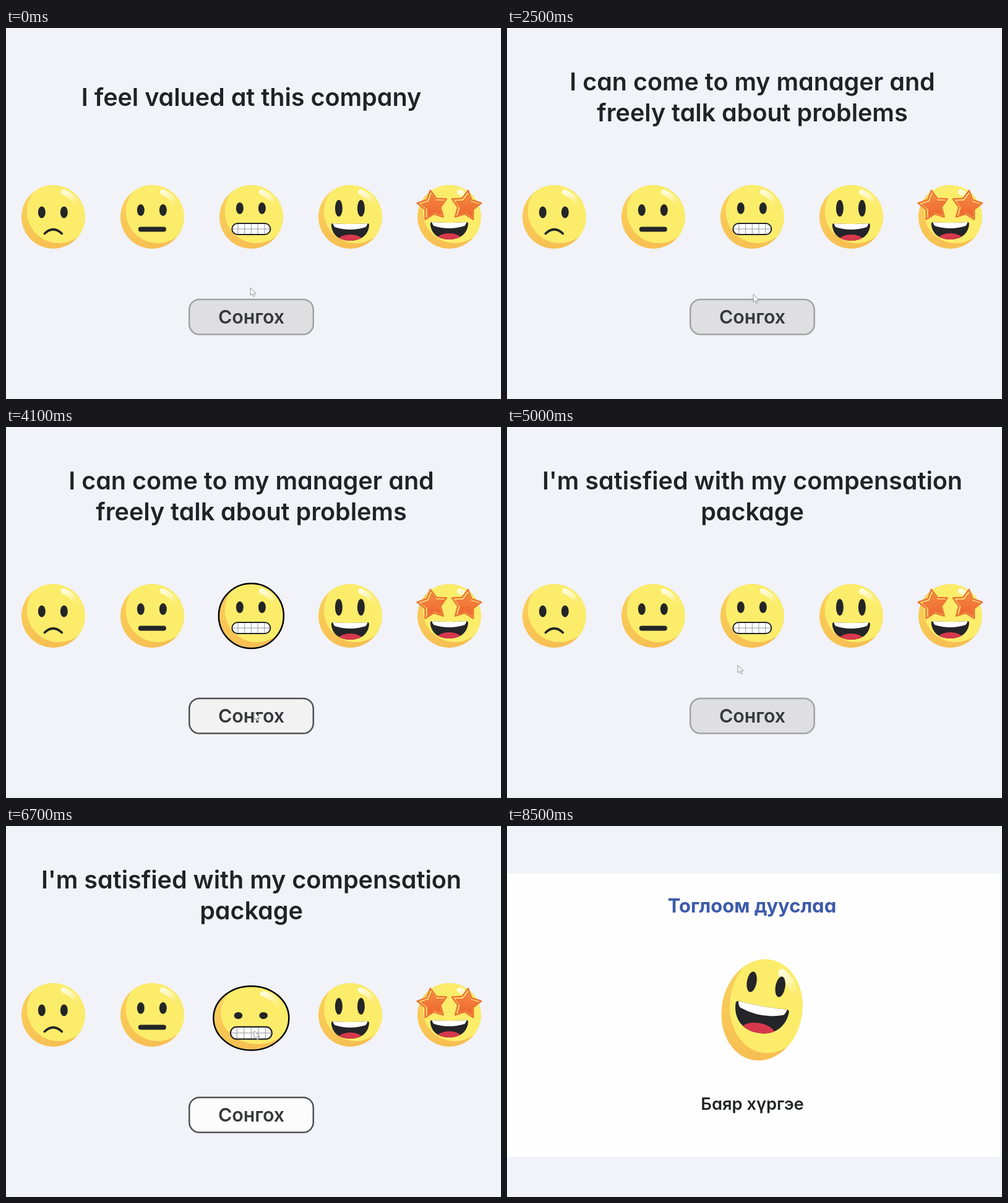
Animation, 800 px wide and 600 px high, one loop 8.6 s. Source, as an HTML page:

```html
<!DOCTYPE html>
<html lang="mn">
<head>
<meta charset="utf-8">
<title>Survey</title>
<style>
  html, body { margin: 0; width: 100%; height: 100%; overflow: hidden; background: #f1f3f9; }
  svg { display: block; width: 800px; height: 600px; }
  text { text-anchor: middle; font-family: Inter, "Open Sans", sans-serif; font-weight: 600; font-feature-settings: "cv11"; fill: #212226; }
  .title { font-size: 39.5px; }
  .over { font-size: 31px; font-weight: 700; fill: #3d5ba9; }
  .cheer { font-size: 27.3px; }
  .label { font-size: 30.3px; fill: #37383b; }
  .ring { fill: none; stroke: #000; stroke-width: 2.5; vector-effect: non-scaling-stroke; }
  .dark { fill: #242528; }
  .button { fill: #dfdfe1; stroke: #a1a2a4; stroke-width: 2.5; }
  .button.ready { fill: #fcfcfc; stroke: #505154; }
  .button.ready.hover { fill: #f2f2f2; }
</style>
</head>
<body>
<svg viewBox="0 0 800 600">
  <defs>
    <clipPath id="disc"><circle r="51.5"/></clipPath>
    <linearGradient id="rim" x1="0" y1="0" x2=".4" y2="1">
      <stop offset="0" stop-color="#fbd25b"/><stop offset="1" stop-color="#f7bf53"/>
    </linearGradient>
    <linearGradient id="shine" gradientUnits="userSpaceOnUse" x1="13" y1="-43" x2="42" y2="-17">
      <stop offset="0" stop-color="#fffde4"/><stop offset=".5" stop-color="#fdf6b0"/>
      <stop offset="1" stop-color="#fbec6a" stop-opacity="0"/>
    </linearGradient>
    <linearGradient id="flame" x1="0" y1="0" x2="0" y2="1">
      <stop offset="0" stop-color="#f58a40"/><stop offset="1" stop-color="#ee6630"/>
    </linearGradient>
    <clipPath id="lips"><path id="lipShape" d="M-28-14Q-31-14-30.5-10C-29 5-17 14 0 14S29 5 30.500-10Q31-14 28-14Q0-12 -28-14Z"/></clipPath>
  </defs>
  <rect width="800" height="600" fill="#f1f3f9"/>
  <g id="quiz">
    <text class="title" id="line1" x="396.5"></text>
    <text class="title" id="line2" x="396.5" y="151"></text>
    <g id="row"></g>
    <rect class="button" id="button" x="296.2" y="438.9" width="200.5" height="56.7" rx="16.5"/>
    <text class="label" x="396.5" y="478">Сонгох</text>
  </g>
  <g id="finish">
    <rect y="77" width="797" height="458" fill="#fefefe"/>
    <text class="over" x="396" y="140">Тоглоом дууслаа</text>
    <g id="winner"></g>
    <text class="cheer" x="396.5" y="459">Баяр хүргэе</text>
  </g>
  <rect y="599" width="800" height="1" fill="#e4efe8"/>
  <path id="cursor" d="M0 0V12.5L3 10 5 14.5 7 13.6 5.200 9.300H9Z" fill="#fff" stroke="#85878c" stroke-width=".9" stroke-linejoin="round"/>
</svg>
<script>
const LOOP = 8600, STEP = 100, END = 7300;
const { sin, abs, PI } = Math;
const $ = id => document.getElementById(id);

const starPath = r => 'M' + Array.from({ length: 10 }, (_, i) => {
  const d = i % 2 ? r * 0.53 : r, a = i * PI / 5;
  return `${(d * sin(a)).toFixed(2)} ${(-d * Math.cos(a)).toFixed(2)}`;
}).join('L') + 'Z';

const star = side => `<g transform="translate(${side * 27}) rotate(${side * 8})" stroke-linejoin="round">
  <path d="${starPath(25)}" fill="#fbd872" stroke="#ec7634" stroke-width="2.500"/>
  <path d="${starPath(19)}" transform="translate(1 1)" fill="url(#flame)" stroke="#ee7535" stroke-width="1.500"/></g>`;

const eyes = ry => [-18.5, 17.5].map(x => `<ellipse class="dark" cx="${x}" rx="6" ry="${ry}"/>`).join('');

const grin = `<use href="#lipShape" class="dark"/>
  <g clip-path="url(#lips)"><ellipse cy="14" rx="20" ry="10" fill="#d6384c"/>
  <path d="M-28-15H28Q28-11 25-8Q0 0-25-8Q-28-11-28-15Z" fill="#fff"/></g>`;

const bars = [-2, -1, 0, 1, 2].map(i => `M${i * 10.7}-9V9`).join('');
const teeth = `<rect x="-31" y="-9" width="62" height="18" rx="9" fill="#fff"/>
  <path d="M-31 0H31${bars}" stroke="#97999c" fill="none"/>
  <rect x="-31" y="-9" width="62" height="18" rx="9" fill="none" stroke="#242528" stroke-width="2"/>`;

const frown = '<path d="M-14 3.500Q0-10 14 3.500" fill="none" stroke="#242528" stroke-width="3.600" stroke-linecap="round"/>';
const flat = '<rect class="dark" x="-22.500" y="-4" width="45" height="8" rx="4"/>';

function makeFace(parent, x, y, eyeArt, eyeY, mouthArt, mouthY) {
  const root = document.createElementNS('http://www.w3.org/2000/svg', 'g');
  root.innerHTML = `<g><g clip-path="url(#disc)"><circle r="51.500" fill="url(#rim)"/>
      <circle cx="9" cy="-9" r="51.500" fill="#fbec6a"/></g>
      <path d="M17-40A45 45 0 0 1 39.500-20" fill="none" stroke="url(#shine)" stroke-width="9" stroke-linecap="round"/>
      <circle class="ring" r="52.500"/></g><g>${eyeArt}</g><g>${mouthArt}</g>`;
  parent.append(root);
  const [body, eye, mouth] = root.children;
  return { root, body, eye, mouth, ring: root.querySelector('.ring'), x, y, eyeY, mouthY };
}

function setPose(f, { dx = 0, dy = 0, turn = 0, body, eye, mouth, eyeShift, mouthShift }) {
  f.root.setAttribute('transform', `translate(${f.x + dx} ${f.y + dy}) rotate(${turn})`);
  f.body.setAttribute('transform', `scale(${body})`);
  f.eye.setAttribute('transform', `translate(0 ${f.eyeY + eyeShift}) scale(${eye})`);
  f.mouth.setAttribute('transform', `translate(0 ${f.mouthY + mouthShift}) scale(${mouth})`);
}

// One jelly wobble: positive squashes, negative stretches
function wobble(t) {
  if (t <= 0 || t >= 600) return 0;
  return sin(2 * PI * (t - 100) / 320) * sin(PI * t / 600) ** 2;
}

const jelly = w => ({
  dy: 8 * w,
  body: [1 + 0.18 * w + 0.1 * w * w, 1 - 0.15 * w + 0.2 * w * w],
  eye: [1 + 0.2 * w, 1 - 0.62 * w], eyeShift: 15 * w,
  mouth: [1 + 0.12 * w, 1 + 0.23 * w * w], mouthShift: 7 * w
});

// Sways side to side, smiling widest at each end
function dance(t) {
  const angle = 2 * PI * (t - 7700) / 640;
  const sway = sin(angle), joy = abs(sway), squash = sin(2 * angle) ** 2;
  return {
    dx: 15.5 * sway, dy: 11 * joy + 4 * squash, turn: 10 * sway,
    body: [1.31 - 0.045 * joy + 0.1 * squash, 1.6 - 0.15 * squash],
    eye: [1.3, 1.58 + 0.18 * joy], eyeShift: -10.5 * joy,
    mouth: [0.64 + 0.79 * joy, 0.95 + 0.67 * joy], mouthShift: -3 * joy
  };
}

const ROUNDS = [
  { from: 0, face: 3, pick: 1000, at: [548, 318], lines: ['I feel valued at this company'] },
  { from: 2200, face: 2, pick: 3320, at: [387, 316], lines: ['I can come to my manager and', 'freely talk about problems'] },
  { from: 4300, face: 2, pick: 6520, at: [401, 331], lines: ["I'm satisfied with my compensation", 'package'] }
];
const MARK_DELAY = 150, BUTTON = [401, 461];

// The pointer rests on a face, then on the button, in every round
const stops = [[100, 395, 420], [5000, 373, 385], [6000, 402, 437], [7700, 391, 462], [8400, 460, -18]];
ROUNDS.forEach(({ pick, at }, i) => {
  const leave = i + 1 < ROUNDS.length ? ROUNDS[i + 1].from : END;
  stops.push([pick - 100, ...at], [pick + 200, ...at], [pick + 560, ...BUTTON], [leave, ...BUTTON]);
});
stops.sort((a, b) => a[0] - b[0]);

function pointer(t) {
  const i = stops.findIndex(s => s[0] > t);
  if (i < 0) return stops[stops.length - 1].slice(1);
  const b = stops[i], a = stops[i - 1] || b;
  const u = a === b ? 0 : (t - a[0]) / (b[0] - a[0]), k = u * u * (3 - 2 * u);
  return [1, 2].map(j => a[j] + (b[j] - a[j]) * k);
}

const faces = [
  [eyes(9.5), -7.5, frown, 23.5],
  [eyes(9.5), -11, flat, 20],
  [eyes(9.5), -14, teeth, 19.5],
  [eyes(13.5), -14, grin, 24.5],
  [star(-1) + star(1), -18, grin, 22.5]
].map((parts, i) => makeFace($('row'), 76.3 + 160 * i, 305.5, ...parts));
const winner = makeFace($('winner'), 396.5, 286.5, eyes(9.5), -31.5, grin, 18);

const show = (el, on) => { el.style.display = on ? '' : 'none'; };
show(winner.ring, false);

function drawRound(t, pointerY) {
  const round = ROUNDS.filter(r => t >= r.from).pop();
  const [first, second = ''] = round.lines;
  const marked = t >= round.pick + MARK_DELAY;
  $('line1').textContent = first;
  $('line2').textContent = second;
  $('line1').setAttribute('y', second ? 101 : 126);
  faces.forEach((f, i) => {
    const chosen = i === round.face;
    setPose(f, jelly(chosen ? wobble(t - round.pick) : 0));
    show(f.ring, chosen && marked);
  });
  $('button').classList.toggle('ready', marked);
  $('button').classList.toggle('hover', pointerY > 438);
}

function draw(t) {
  const ended = t >= END, [x, y] = pointer(t);
  show($('quiz'), !ended);
  show($('finish'), ended);
  $('cursor').setAttribute('transform', `translate(${x} ${y})`);
  if (ended) setPose(winner, dance(t));
  else drawRound(t, y);
}

const start = performance.now();
function tick() {
  const t = (performance.now() - start) % LOOP;
  draw(Math.floor(t / STEP) * STEP);
  requestAnimationFrame(tick);
}
tick();
</script>
</body>
</html>
```
